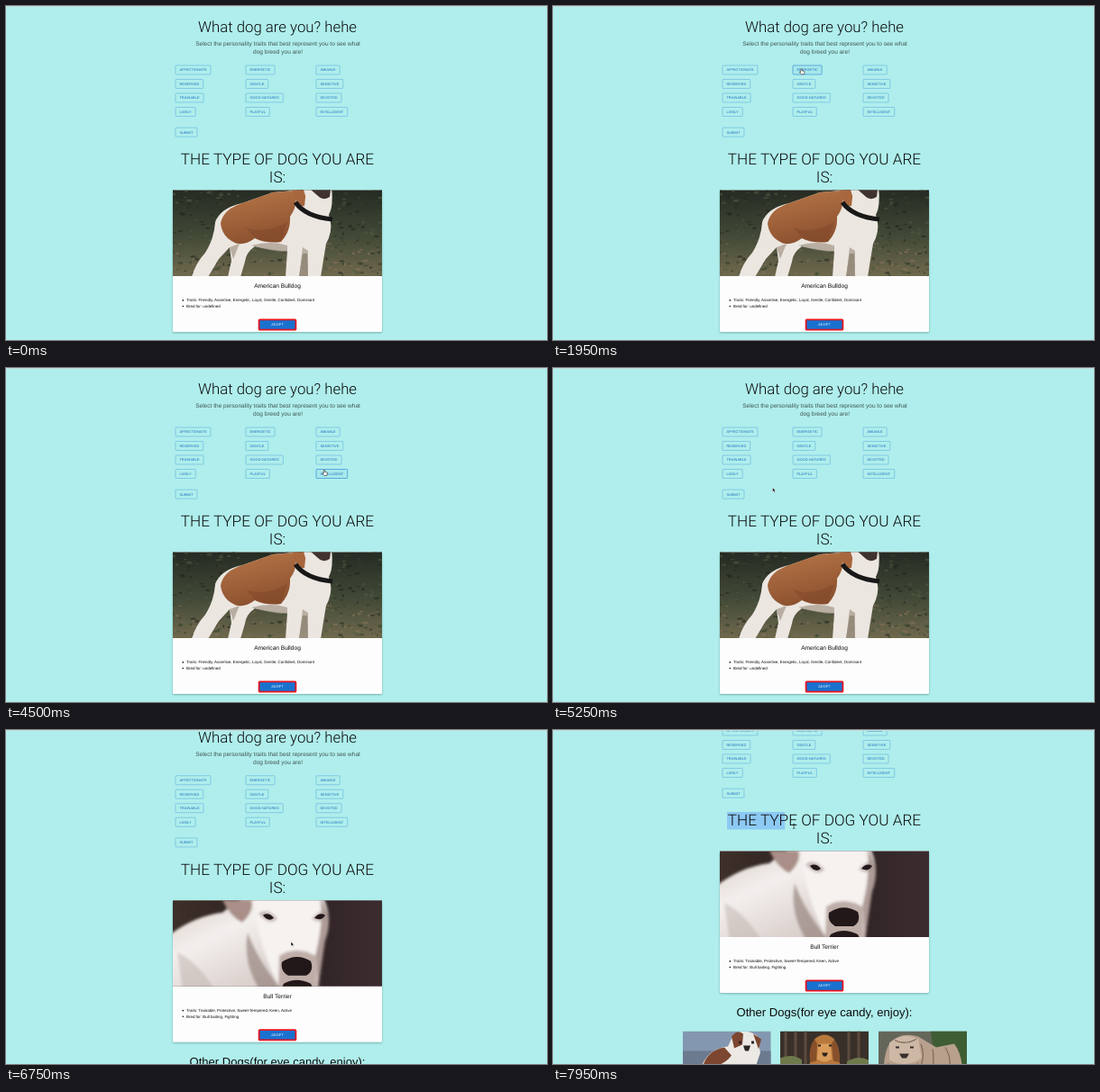
An HTML page that plays this animation: 600 px wide and 371 px high, repeating every 8 s.

```html
<!DOCTYPE html>
<html lang="en">
<head>
<meta charset="utf-8">
<title>What dog are you?</title>
<style>
  html, body { margin: 0; width: 100%; height: 100%; overflow: hidden; background: #afeeec; }
  #stage { display: block; width: 600px; height: 371px; }
  svg { font-family: "Liberation Sans", Arial, sans-serif; }
  text { fill: #0c0c0c; text-rendering: geometricPrecision; }
  .mid { text-anchor: middle; }
  .light { font-family: Roboto, sans-serif; font-weight: 300; }
  .label { font-size: 3.85px; letter-spacing: .1px; fill: #1668c0; }
  .facts { font-size: 4.44px; }
</style>
</head>
<body>
<svg id="stage" viewBox="0 0 600 371">
  <defs>
    <linearGradient id="woods" x2="0" y2="1">
      <stop stop-color="#252b23"/><stop offset=".55" stop-color="#434a37"/><stop offset="1" stop-color="#716a4e"/>
    </linearGradient>
    <linearGradient id="room">
      <stop stop-color="#3d2f29"/><stop offset=".5" stop-color="#2c2020"/><stop offset="1" stop-color="#3b2c30"/>
    </linearGradient>
    <linearGradient id="coat" x2=".8" y2="1">
      <stop stop-color="#d5c9c3"/><stop offset=".4" stop-color="#f3efed"/><stop offset="1" stop-color="#cfc2be"/>
    </linearGradient>
    <linearGradient id="hide" x2=".3" y2="1">
      <stop stop-color="#b87748"/><stop offset="1" stop-color="#8d5230"/>
    </linearGradient>
    <filter id="soft"><feGaussianBlur stdDeviation="1.5"/></filter>
    <filter id="fine"><feGaussianBlur stdDeviation=".5"/></filter>
    <filter id="shade" x="-5%" y="-5%" width="110%" height="112%"><feGaussianBlur stdDeviation="1"/></filter>
  </defs>

  <g id="page">
    <text class="mid light" x="301" y="29.3" font-size="16.8">What dog are you? hehe</text>
    <g class="mid" font-size="6.56" fill-opacity=".68">
      <text x="301.5" y="44.2">Select the personality traits that best represent you to see what</text>
      <text x="301.5" y="52.8">dog breed you are!</text>
    </g>
    <g id="buttons"></g>

    <rect id="selection" x="193" y="161" height="19.5" fill="#8cc9f4"/>
    <g class="mid light" font-size="17.2">
      <text x="301" y="176.4">THE TYPE OF DOG YOU ARE</text>
      <text x="301" y="196">IS:</text>
    </g>

    <rect x="185" y="206" width="232" height="157" rx="1.5" fill="#2f6662" opacity=".45" filter="url(#shade)"/>
    <rect x="185" y="204.5" width="232" height="157.5" rx="1.5" fill="#fdfdfd"/>

    <g id="bulldog">
      <svg x="185" y="204.5" width="232" height="95.5" viewBox="185 204.5 232 95.5">
        <rect x="185" y="204" width="232" height="97" fill="url(#woods)"/>
        <g id="leaves"></g>
        <g filter="url(#fine)">
          <path fill="#ebe6e0" d="M232 240Q238 224 262 219L296 207 330 204H360Q364 220 358 232 364 248 355 264L352 282 349 301H335L334 275 329 275 325 301H310L312 272Q298 272 276 267 266 274 265 284L260 301H246L250 283 248 268 236 281 224 301H206Q210 286 221 274 231 258 232 240Z"/>
          <path fill="#a99b8e" d="M272 266Q294 260 312 266L312 273Q296 273 272 266ZM329 268L335 272 335 301H325ZM248 268L259 264 252 281Z" opacity=".75"/>
          <path fill="url(#hide)" d="M238 242Q240 226 262 219L296 207 320 205Q325 220 315 234 316 250 305 262 288 264 276 258 262 268 252 262 240 256 238 242Z"/>
          <path fill="#7d4528" d="M266 246Q286 254 312 240L304 262Q288 263 277 258Z" opacity=".45"/>
          <path fill="#a8663d" d="M318 204H333L331 222Q322 224 318 204Z"/>
          <path fill="none" stroke="#191818" stroke-width="5" d="M321 218Q332 234 362 237"/>
          <path fill="#ebe6e0" d="M330 204H361Q364 219 354 228 336 228 330 204Z"/>
          <path fill="#40322f" d="M338 204H360L359 212Q351 217 346 211Z"/>
        </g>
      </svg>
      <text class="mid" x="301" y="312.8" font-size="6.6">American Bulldog</text>
      <text class="facts" x="200" y="328.4">Traits: Friendly, Assertive, Energetic, Loyal, Gentle, Confident, Dominant</text>
      <text class="facts" x="200" y="335">Bred for: undefined</text>
    </g>

    <g id="terrier">
      <svg x="185" y="204.5" width="232" height="95.5" viewBox="185 204.5 232 95.5">
        <rect x="185" y="204" width="232" height="97" fill="url(#room)"/>
        <g filter="url(#soft)">
          <path fill="url(#coat)" d="M180 244Q208 222 240 218L266 198H350Q364 222 353 250L346 305H180Z"/>
          <path fill="#a98f87" d="M240 204H272Q276 216 262 229 248 222 240 204Z"/>
          <path fill="#8c7872" d="M268 240Q278 268 304 302H280Q262 272 268 240Z" opacity=".6"/>
          <path fill="#a89a95" d="M190 262Q214 274 232 305H196Z" opacity=".35"/>
          <path fill="#f6f2f0" d="M274 200H346Q354 230 345 256L345 302H304Q280 258 274 200Z"/>
          <path fill="#a28c87" d="M349 202Q364 224 354 250L346 302 343 266Q352 232 349 202Z" opacity=".8"/>
          <path fill="#ad9790" d="M303 266Q322 254 343 266L345 302H302Z" opacity=".75"/>
          <path fill="#a6928c" d="M280 219Q291 212 301 225 292 234 280 219ZM339 225Q349 212 358 220 352 233 339 225Z" opacity=".6"/>
        </g>
        <g fill="#221819" filter="url(#fine)">
          <path d="M306 273Q322 262 338 272 342 283 333 288H313Q304 283 306 273ZM308 297Q322 289 338 297L340 301H306Z"/>
          <path d="M285 221Q291 217 297 224 291 229 285 221ZM342 224Q348 217 354 221 350 228 342 224Z"/>
        </g>
      </svg>
      <text class="mid" x="301" y="312.8" font-size="6.6">Bull Terrier</text>
      <text class="facts" x="200" y="328.4">Traits: Trainable, Protective, Sweet-Tempered, Keen, Active</text>
      <text class="facts" x="200" y="335">Bred for: Bull baiting, Fighting</text>
    </g>

    <circle cx="196.3" cy="326.9" r=".8"/><circle cx="196.3" cy="333.5" r=".8"/>
    <rect x="280.6" y="348.3" width="40.8" height="11.4" rx="1" fill="#1971cf" stroke="#e8131c" stroke-width="1.8"/>
    <text class="mid label" x="301" y="355.3" style="fill:#fff">ADOPT</text>

    <text class="mid" x="301" y="388" font-size="13.05">Other Dogs(for eye candy, enjoy):</text>

    <svg x="144" y="404.5" width="97.5" height="60" viewBox="0 0 97.5 60">
      <rect width="98" height="60" fill="#8497b0"/><rect y="22" width="98" height="38" fill="#6c7a90"/>
      <path fill="#ece9e5" d="M20 42Q26 20 50 17L56 4Q70-4 82 5L86 24Q80 40 76 60H18Z"/>
      <path fill="#7d4630" d="M22 40Q26 22 46 18L54 27Q44 40 30 38ZM54 6Q60-2 67 3L66 15 57 19ZM78 3L87 9 84 20Z"/>
      <path fill="#2b2524" d="M67 16h8l-2 6h-4zM62 11h3v3h-3zM76 11h3v3h-3z"/>
    </svg>
    <svg x="252" y="404.5" width="98" height="60" viewBox="0 0 98 60">
      <rect width="98" height="60" fill="#393029"/>
      <path stroke="#5c4a3d" stroke-width="3" d="M6 0V60M17 0V60M28 0V60M76 0V60M87 0V60"/>
      <path fill="#6f7a4c" d="M0 30Q14 24 24 32V60H0ZM74 34Q86 26 98 32V60H74Z"/>
      <path fill="#b9783c" d="M38 9Q49-1 60 9L65 30 71 60H29L34 28Z"/>
      <path fill="#87502a" d="M38 9Q31 18 33 35L40 33 41 14ZM60 9Q67 18 66 35L59 33 57 14Z"/>
      <path fill="#d99c5a" d="M42 14H56L57 31Q49 37 41 31Z"/>
      <path fill="#2b211c" d="M46 24h7l-2 4h-3zM42 15h3v2h-3zM54 15h3v2h-3z"/>
    </svg>
    <svg x="361" y="404.5" width="98" height="60" viewBox="0 0 98 60">
      <rect width="98" height="60" fill="#65665a"/><path fill="#3f5d33" d="M58 0H98V60H66Z"/>
      <path fill="#b8a08d" d="M6 60Q4 28 12 14 24 0 44 6L64 18 84 14Q96 30 92 60Z"/>
      <path fill="#cdb8a5" d="M12 13Q28 0 44 9L48 30Q30 42 12 32Z"/>
      <path fill="none" stroke="#816c5d" stroke-width="1.3" d="M18 10Q28 16 42 9M47 14Q53 30 44 44M60 20Q63 38 56 54M10 36Q28 48 44 36M74 18Q82 30 78 50"/>
      <path fill="#39302d" d="M19 17h4v2h-4zM35 17h4v2h-4zM23 25h11l-3 5h-5z"/>
    </svg>
  </g>

  <rect width="600" height="1" fill="#c3dcdc"/>
  <g id="cursor" stroke-linejoin="round">
    <path id="hand" fill="#fff" stroke="#222" stroke-width=".6" d="M-.7.5Q0-.4.7.5V2.4L3 2.9Q3.7 3.1 3.5 4L3 6.4H-.3L-2.2 3.9Q-1.9 3-.7 4Z"/>
    <path id="arrow" fill="#111" stroke="#fff" stroke-width=".5" d="M0 0V5L1.2 4 2 5.8 2.9 5.4 2.1 3.7H3.6Z"/>
    <path id="ibeam" fill="none" stroke="#222" stroke-width=".7" d="M-1.2-2.6Q0-2.6 0-2Q0-2.6 1.2-2.6M0-2V2M-1.2 2.6Q0 2.6 0 2Q0 2.6 1.2 2.6"/>
  </g>
</svg>
<script>
const LOOP = 8000, RESULT_AT = 5880, DRAG_AT = 7650;
const $ = id => document.getElementById(id);
const clamp = v => Math.min(1, Math.max(0, v));
const smooth = v => (v = clamp(v)) * v * (3 - 2 * v);
const show = (id, on) => $(id).style.display = on ? "" : "none";

function add(parent, tag, attrs) {
  const el = document.createElementNS("http://www.w3.org/2000/svg", tag);
  for (const key in attrs) el.setAttribute(key, attrs[key]);
  return parent.appendChild(el);
}

// Seeded foliage behind the bulldog
let seed = 7;
const random = () => (seed = seed * 16807 % 2147483647) / 2147483647;
const greens = ["#4d5a42", "#20261e", "#36422d", "#68634a", "#85705a"];
for (let i = 0; i < 500; i++) {
  const depth = random();
  add($("leaves"), "ellipse", {
    cx: 185 + random() * 232, cy: 204 + depth * 96, rx: .8 + random() * 2.4, ry: .5 + random() * 1.3,
    fill: greens[Math.floor(random() * (depth > .6 ? 5 : 3))], opacity: .6
  });
}

const traits = ["AFFECTIONATE", "ENERGETIC", "AMIABLE", "RESERVED", "GENTLE", "SENSITIVE", "TRAINABLE",
  "GOOD-NATURED", "DEVOTED", "LIVELY", "PLAYFUL", "INTELLIGENT", "SUBMIT"];
const buttons = traits.map((name, i) => {
  const x = 188 + i % 3 * 78;
  const y = name === "SUBMIT" ? 135.2 : 66 + Math.floor(i / 3) * 15.5;
  const group = add($("buttons"), "g", {});
  const label = add(group, "text", { class: "label", x: x + 4.4, y: y + 6.4 });
  label.textContent = name;
  const w = label.getComputedTextLength() + 8.8, h = 10;
  const box = add(group, "rect", { x, y, width: w, height: h, rx: .7, stroke: "#1976d2", "stroke-width": .6, fill: "#1976d2" });
  const clip = add(group, "svg", { x, y, width: w, height: h });
  const ripple = add(clip, "circle", { fill: "#1976d2" });
  return { name, x, y, w, h, box, ripple };
});

// Pointer stops: time, x, y
const path = [
  [50, 54, 120], [800, 200, 73], [1250, 205, 70], [1700, 206, 70], [1930, 275.5, 69.5], [2500, 276, 70],
  [3150, 286.5, 87.5], [3500, 286.5, 87.5], [4300, 353, 113], [4750, 353, 113], [5500, 205.5, 139.5],
  [6050, 205.5, 139.5], [6500, 316, 235], [7200, 316, 235], [DRAG_AT, 193, 101], [8150, 307, 110]
];
function pointerAt(t) {
  const next = Math.max(1, path.findIndex(stop => stop[0] > t));
  const [t0, x0, y0] = path[next - 1], [t1, x1, y1] = path[next];
  const k = smooth((t - t0) / (t1 - t0));
  return { x: x0 + (x1 - x0) * k, y: y0 + (y1 - y0) * k };
}

const clicks = { AFFECTIONATE: 1150, ENERGETIC: 2100, GENTLE: 3300, INTELLIGENT: 4550, SUBMIT: 5650 };

function drawButton(b, t, p, scroll) {
  const hover = t >= 50 && p.x > b.x && p.x < b.x + b.w && p.y + scroll > b.y && p.y + scroll < b.y + b.h;
  b.box.setAttribute("stroke-opacity", hover ? .9 : .5);
  b.box.setAttribute("fill-opacity", hover ? .05 : 0);
  const age = t - clicks[b.name];
  const active = age >= 0 && age < 600;
  b.ripple.setAttribute("opacity", active ? .32 * (1 - clamp((age - 350) / 250)) : 0);
  if (active) {
    const origin = pointerAt(clicks[b.name]);
    b.ripple.setAttribute("cx", origin.x - b.x);
    b.ripple.setAttribute("cy", origin.y - b.y);
    b.ripple.setAttribute("r", 6 + 34 * smooth(age / 550));
  }
  return hover;
}

function draw(t) {
  const scroll = 70 * smooth((t - 6540) / 700);
  const p = pointerAt(t);
  $("page").setAttribute("transform", `translate(0 ${-scroll})`);
  const overButton = buttons.filter(b => drawButton(b, t, p, scroll)).length > 0;

  show("bulldog", t < RESULT_AT);
  show("terrier", t >= RESULT_AT);
  const dragging = t >= DRAG_AT;
  $("selection").setAttribute("width", dragging ? Math.max(0, pointerAt(t - 30).x - 193) : 0);

  show("cursor", t >= 50);
  $("cursor").setAttribute("transform", `translate(${p.x} ${p.y})`);
  show("hand", overButton);
  show("ibeam", dragging);
  show("arrow", !overButton && !dragging);
}

const start = performance.now();
function tick() {
  draw((performance.now() - start) % LOOP);
  requestAnimationFrame(tick);
}
tick();
</script>
</body>
</html>
```
